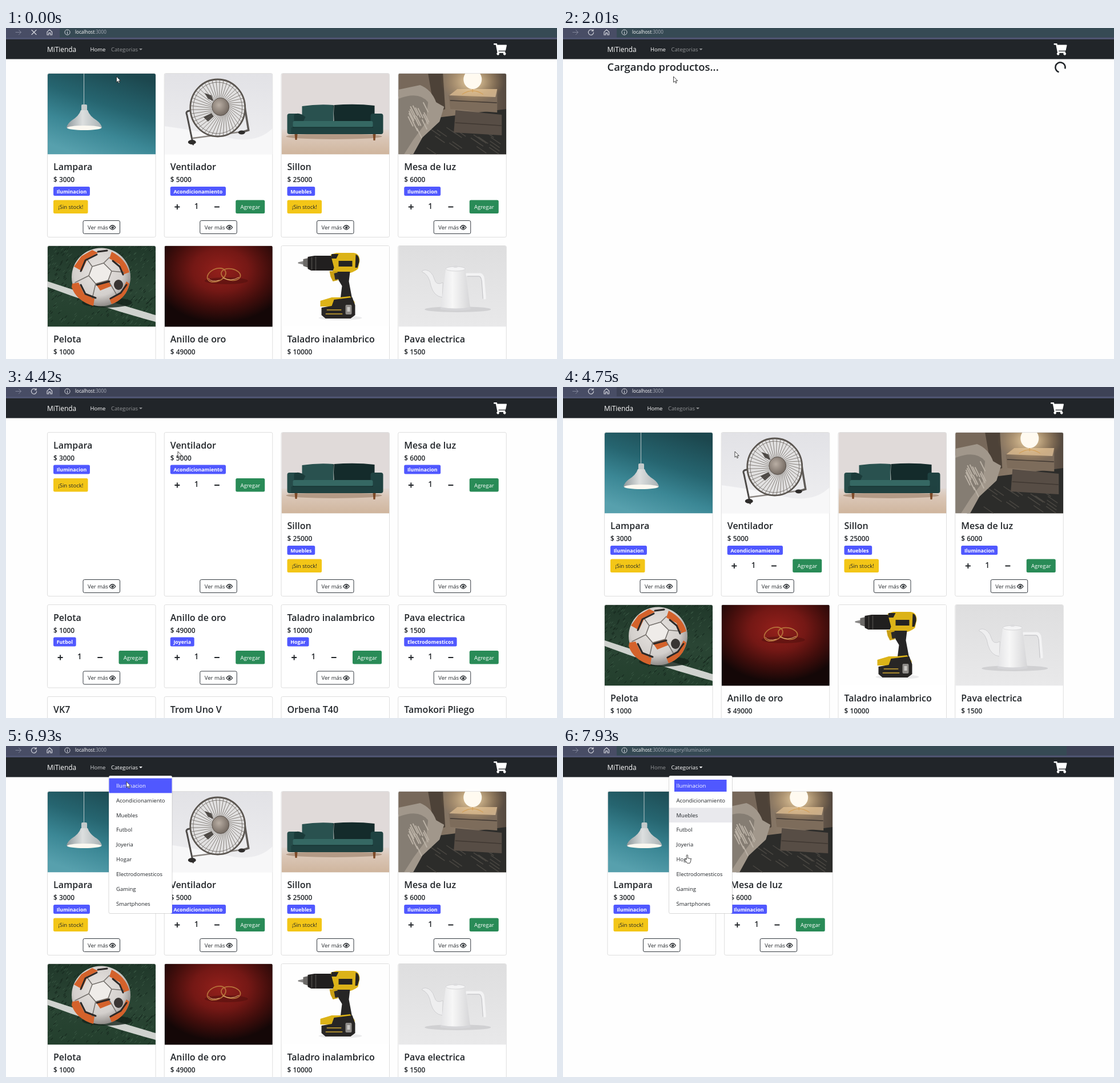
These frames come from a looping animation (965x580 px, 8000 ms). An HTML page:

```html
<!DOCTYPE html>
<html lang="es">
<head>
<meta charset="utf-8">
<title>MiTienda</title>
<style>
html, body { margin: 0; width: 100%; height: 100%; overflow: hidden; background: #fefefe; }
svg { display: block; width: 100vw; height: 100vh; }
text { font-family: "Open Sans", "Noto Sans", sans-serif; font-size: 9.5px; fill: #212529; white-space: pre; }
.title { font-size: 16px; font-weight: 600; }
.price { font-size: 11.9px; font-weight: 600; }
.badge text { font-size: 8.85px; font-weight: 700; fill: #fff; }
.qty { font-size: 13.5px; font-weight: 600; }
.mid { text-anchor: middle; }
.brand { font-size: 11.9px; fill: #fff; }
.loading { font-size: 18.4px; font-weight: 600; }
.url, .url tspan { font-size: 8.15px; }
.line { fill: none; stroke-linecap: round; }
</style>
</head>
<body>
<svg id="stage" viewBox="0 0 965 580" preserveAspectRatio="none"></svg>
<script>
const LOOP = 8000, SHIFT = 5.5, IMG_H = 141.5, CARD_W = 189.5;
const stage = document.getElementById('stage');
const BLUE = '#5058ff';

const rect = (x, y, w, h, fill, extra = '') =>
  `<rect x="${x}" y="${y}" width="${w}" height="${h}" fill="${fill}" ${extra}/>`;
const path = (d, fill, extra = '') => `<path d="${d}" fill="${fill}" ${extra}/>`;
const line = (d, stroke, w = 1) => `<path class="line" d="${d}" stroke="${stroke}" stroke-width="${w}"/>`;
const oval = (x, y, rx, ry, fill, extra = '') =>
  `<ellipse cx="${x}" cy="${y}" rx="${rx}" ry="${ry}" fill="${fill}" ${extra}/>`;
const text = (x, y, s, cls = '', extra = '') => `<text x="${x}" y="${y}" class="${cls}" ${extra}>${s}</text>`;
const stops = list => list.map(([o, c, a = 1]) => `<stop offset="${o}" stop-color="${c}" stop-opacity="${a}"/>`).join('');
const linear = (id, [x1, y1, x2, y2], ...list) =>
  `<linearGradient id="${id}" x1="${x1}" y1="${y1}" x2="${x2}" y2="${y2}">${stops(list)}</linearGradient>`;
const radial = (id, cx, cy, r, ...list) =>
  `<radialGradient id="${id}" cx="${cx}" cy="${cy}" r="${r}">${stops(list)}</radialGradient>`;
const backdrop = fill => rect(0, 0, 189, IMG_H, fill);
const DOWN = [0, 0, 0, 1], ACROSS = [0, 0, 1, 0];

let seed = 7;
const random = () => (seed = seed * 16807 % 2147483647) / 2147483647;

// Short random strokes for grass, wood grain and carpet.
function strokes(n, [x, y, w, h], dx, dy) {
  let d = '';
  for (let i = 0; i < n; i++) d += `M${(x + w * random()).toFixed(1)} ${(y + h * random()).toFixed(1)}l${dx} ${dy}`;
  return d;
}

function fan() {
  let wires = '';
  for (let i = 0; i < 44; i++) {
    const a = i * Math.PI / 22, b = a + 0.22;
    wires += `M${98 + 16 * Math.cos(a)} ${58 + 16 * Math.sin(a)}L${93 + 47 * Math.cos(b)} ${60 + 49 * Math.sin(b)}`;
  }
  return backdrop('url(#fanBg)') + path('M0 92Q60 100 110 112T189 96V141.5H0z', '#f7f7f8') +
    line('M55 62L40 66Q37 68 39 72L50 124', '#4e4b49', 3) +
    line('M134 46Q138 45 139 50L147 99L134 103', '#5f5b58', 3.5) +
    line('M50 113L96 107L134 102', '#8b8682', 2.5) +
    oval(48, 120, 7, 4, '#2e2c2b') + oval(135, 103, 6, 3.5, '#2e2c2b') +
    oval(93, 60, 48, 50, '#e2e1e1', 'stroke="#5a5550" stroke-width="2.8"') +
    path('M70 34L82 38L86 48L76 44zM68 76L82 69L86 75L76 84z', '#4a4643') +
    line(wires, '#6b655f', 0.8) + oval(93, 60, 43, 45, 'none', 'stroke="#6a6561" stroke-width=".8"') +
    oval(98, 58, 15, 15.5, 'url(#hub)', 'stroke="#57504a"');
}

const photos = {
  lamp: backdrop('url(#lampBg)') + line('M63.5 0V55', '#b9c6c7') +
    rect(59, 54, 10, 12, '#c4cacb', 'rx="2"') +
    path('M58 64Q55 74 42 82Q34 88 33 95Q64 102 95 95Q94 88 86 82Q73 74 70 64z', 'url(#lampShade)') +
    oval(64, 95, 30, 4, '#fbf8f0'),
  fan: fan(),
  sofa: backdrop('#e0dad9') + path('M0 98H189V141.5H0z', 'url(#floor)') +
    oval(92, 110, 84, 5, '#b39a86') +
    path('M23 106H28L27 116H24zM160 106H165L164 117H161z', '#7d4a28') +
    path('M36 57Q64 53 91 55V88H36z', '#29514f') + path('M92 55Q130 52 163 56V88H92z', '#142b2b') +
    rect(10, 70, 22, 36, '#264c4a', 'rx="4"') + rect(156, 70, 22, 36, '#1f4241', 'rx="4"') +
    path('M22 72Q30 66 42 76L38 84H22z', '#1b3b3a') +
    rect(20, 83, 140, 11, '#356863', 'rx="3"') + rect(17, 94, 155, 12, '#1f4140') +
    line('M20 94H160M91 56L93 83', '#102827'),
  table: backdrop('url(#bedWall)') + path('M0 0H52L66 40L64 70L0 40z', '#77685a') + path('M52 0H78L82 62L64 70z', '#4d4238') +
    path('M60 78L189 62V141.5H20z', '#2c2c2a') +
    line(strokes(22, [50, 84, 120, 50], 16, 11), '#494641', 1.5) +
    path('M0 28L38 20Q58 28 66 50L80 58L72 84L42 112L26 141H0z', '#a1978b') +
    path('M0 44Q36 30 52 50L48 86L26 116L10 141H0z', '#857d73') +
    line(strokes(16, [2, 48, 46, 52], 8, 16), '#bab1a5', 2) +
    path('M88 38L103 27H173V68L91 62z', '#7d6c5b') + path('M89 38L103 27H173L170 41z', '#c9ae8c') +
    path('M100 64L181 72V108L97 103z', '#574d45') + line('M91 47L172 51M100 86L180 91', '#3f3731', 1.5) +
    oval(130, 14, 56, 38, 'url(#glow)') + line('M112 36Q130 24 148 36M130 26V32', '#d3a25e', 1.5) +
    oval(130, 10, 16, 17, '#fffaf0'),
  ball: backdrop('url(#grass)') + line(strokes(220, [0, 0, 189, 141], 3, -3), '#3b5a45', 1) +
    line(strokes(200, [0, 0, 189, 141], 3, -3), '#182b20', 1.2) +
    path('M0 62Q90 92 189 121V133Q90 106 0 72z', '#cfd2ce') + oval(104, 99, 44, 9, '#15241b', 'opacity=".8"') +
    oval(93.5, 54.5, 51.5, 51, 'url(#ballTone)') +
    path('M46 36L59 18L78 7L88 12L70 22L60 44zM112 10Q136 22 143 46L132 50L126 32L108 22zM43 66L54 64L64 84L82 92L80 105Q50 96 42 72zM138 62L143 66Q138 92 112 102L108 92L128 82zM84 66L106 60L112 70L92 78z', '#d4622b') +
    path('M78 36L98 30L112 44L106 60L84 66L72 52z', '#efece9') +
    line('M78 36L68 22M98 30L108 20M112 44L134 46M106 60L120 84M84 66L78 92M72 52L48 64M78 36L98 30L112 44L106 60L84 66L72 52z', '#77736f', 1.6) +
    line('M58 44L66 25L86 15M114 26L126 36L132 50M58 68L66 84L84 91M110 92L128 82L138 68M88 10L104 8M86 68L108 62', '#2c2928', 3) +
    oval(124, 68, 8, 9, '#393533'),
  rings: backdrop('#140707') + backdrop('url(#velvet)') + oval(108, 61, 38, 6, '#4c0f0d', 'opacity=".5"') +
    `<g fill="none" stroke="#b5713a" stroke-width="1.8">${oval(91, 51, 17, 11, 'none', 'transform="rotate(-24 91 51)"')}${oval(116, 50, 17, 10, 'none', 'transform="rotate(10 116 50)"')}</g>` +
    line('M77 57Q82 64 96 60M102 56Q116 63 130 55', '#e8b87c', 1),
  drill: backdrop('#fefefe') + oval(103, 126, 38, 4, '#ebebec') +
    path('M29 28.5L40 26V33L29 30.5z', '#8a8988') + path('M38 23L47 21V38L38 35z', '#6b6967') +
    path('M46 19L58 17H94V43H52L46 40z', '#211f1f') + line('M53 20V41M60 19V42', '#4b4947', 1.5) +
    path('M86 15L96 12H126Q137 13 137 26L134 40Q126 47 114 48H88L92 38z', '#dcb318') +
    path('M100 26H124V36H100zM88 14H100L96 22H86zM130 15Q137 17 136 28L133 38H129z', '#252423') +
    path('M96 45H120L118 62L124 94H103L106 70L100 60z', '#262525') +
    path('M84 44H98L99 60L90 62L86 54z', '#c99f14') + path('M92 48L100 46V58L94 59z', '#2b2929') +
    path('M68 96L88 90H102L120 88L128 98V106H68z', '#dcb318') + path('M92 94L124 90L129 104V121L121 127H77L70 121V108L88 105z', '#282625') +
    rect(112, 103, 11, 17, '#8e8b88', 'rx="2"') + rect(115, 107, 5, 8, '#c9c7c4') + line('M80 112H104M78 119H106', '#a8892e', 2),
  kettle: backdrop('url(#kettleBg)') + oval(104, 111, 58, 5, '#d0d0d2') +
    path('M78 64L77 90Q62 88 57 70Q54 50 41 45Q42 42 48 42Q59 44 63 58Q66 70 78 64z', '#eeeeef', 'stroke="#c8c8cb" stroke-width=".8"') +
    line('M120 50H142Q147 50 148 57L151 91', '#f3f3f4', 5) + line('M121 53H141Q145 54 146 62L148 92', '#bfbfc3', 1) +
    path('M83 40Q100 36 117 40L126 110Q100 115 74 110z', 'url(#kettleBody)') +
    oval(100, 40, 17, 4, '#f4f4f5', 'stroke="#cfcfd1" stroke-width=".8"') + oval(100, 36, 4, 2, '#dcdcde') +
    path('M74 107Q100 112 126 107V111Q100 116 74 111z', '#d5d5d8')
};

const defs = `<defs>
<clipPath id="frame"><path d="M0 ${IMG_H}V2.5Q0 0 2.5 0H186.5Q189 0 189 2.5V${IMG_H}z"/></clipPath>` +
  linear('lampBg', [0.75, 0, 0.3, 1], [0, '#1c474e'], [0.4, '#266570'], [0.7, '#3b8795'], [1, '#57a0ad']) +
  linear('lampShade', ACROSS, [0, '#8f999c'], [0.45, '#dcdfdf'], [1, '#aab2b4']) +
  linear('fanBg', DOWN, [0, '#e2e2e6'], [1, '#efeff1']) +
  radial('hub', 0.4, 0.4, 0.6, [0, '#b9aea4'], [1, '#766c64']) +
  linear('floor', DOWN, [0, '#e0d6d0'], [0.35, '#dac6b6'], [1, '#cfb59d']) +
  linear('bedWall', ACROSS, [0, '#6f6255'], [0.6, '#8c7b69'], [1, '#55493f']) +
  radial('glow', 0.5, 0.5, 0.5, [0, '#ffe7b8', 0.9], [1, '#c99a5c', 0]) +
  linear('grass', DOWN, [0, '#20382a'], [0.5, '#2a4534'], [1, '#233f2d']) +
  radial('ballTone', 0.45, 0.4, 0.6, [0, '#e9e5e2'], [0.7, '#d3cfcc'], [1, '#918d8a']) +
  radial('velvet', 0.52, 0.3, 0.65, [0, '#94201b'], [0.4, '#741815'], [0.7, '#430e0c'], [1, '#140707']) +
  linear('kettleBg', DOWN, [0, '#dededf'], [1, '#e9e9ea']) +
  linear('kettleBody', ACROSS, [0, '#e4e4e6'], [0.4, '#f7f7f7'], [1, '#d6d6d8']) +
  Object.entries(photos).map(([id, s]) => `<g id="${id}" clip-path="url(#frame)">${s}</g>`).join('') + '</defs>';

// name, price, category, photo, out of stock
const products = [
  ['Lampara', 3000, 'Iluminacion', 'lamp', true],
  ['Ventilador', 5000, 'Acondicionamiento', 'fan'],
  ['Sillon', 25000, 'Muebles', 'sofa', true],
  ['Mesa de luz', 6000, 'Iluminacion', 'table'],
  ['Pelota', 1000, 'Futbol', 'ball'],
  ['Anillo de oro', 49000, 'Joyeria', 'rings'],
  ['Taladro inalambrico', 10000, 'Hogar', 'drill'],
  ['Pava electrica', 1500, 'Electrodomesticos', 'kettle'],
  ['VK7', 90000, 'Gaming', ''],
  ['Trom Uno V', 80000, 'Gaming', ''],
  ['Orbena T40', 70000, 'Smartphones', ''],
  ['Tamokori Pliego', 60000, 'Gaming', '']
];
const categories = [...new Set(products.map(p => p[2]))];

function card([name, price, category, photo, soldOut], col, y, h, loaded) {
  const x = 72.5 + 204.75 * col, top = loaded ? y + IMG_H : y, tx = x + 10.5;
  const by = y + h - 29, bx = x + 62.5;
  const buy = soldOut
    ? rect(tx, top + 80.5, 60.5, 23.5, '#f3c617', 'rx="2.5"') + text(tx + 30.2, top + 96, '¡Sin stock!', 'mid')
    : line(`M${x + 18.8} ${top + 92.5}h7.6m-3.8-3.8v7.6M${x + 88.5} ${top + 92.5}h7.4`, '#212529', 1.9) +
      text(x + 56.3, top + 95.5, '1', 'qty mid') +
      rect(x + 125, top + 80.5, 51, 23.5, '#298b57', 'rx="2.5"') +
      text(x + 150.5, top + 96, 'Agregar', 'mid', 'style="fill:#fff"');
  return rect(x, y, CARD_W, h, '#fff', 'rx="2.5" stroke="#dedede"') +
    (loaded ? `<use href="#${photo}" x="${x + 0.5}" y="${y + 0.5}"/>` : '') +
    text(tx, top + 28, name, 'title') + text(tx, top + 49, '$ ' + price, 'price') +
    `<g class="badge">${rect(tx, top + 57, 60, 16, BLUE, 'rx="2.5"')}${text(tx + 5.7, top + 68.5, category)}</g>` + buy +
    rect(bx, by, 64.5, 23, '#fff', 'rx="2.5" stroke="#343a40"') + text(bx + 8, by + 15.3, 'Ver más') +
    `<g transform="translate(${x + 114} ${by + 12})">${path('M-5.3 0Q0-7.6 5.3 0Q0 7.6-5.3 0z', 'none', 'stroke="#212529" stroke-width="1.2"')}${oval(0, 0, 2.3, 2.3, '#212529')}${oval(-0.7, -0.7, 0.8, 0.8, '#fff')}</g>`;
}

const home = products.slice(0, 8).map((p, i) => card(p, i % 4, i < 4 ? 79.5 : 381.5, 287, true)).join('');
const rowY = [79.5, 381.5, 542.5], rowH = [287, 145.5, 145.5];
const partial = products.map((p, i) => card(p, i % 4, rowY[i >> 2], rowH[i >> 2], p[3] === 'sofa')).join('');
const filtered = card(products[0], 0, 79.5, 287, true) + card(products[3], 1, 79.5, 287, true);

const ICON = '#d9dbe2';
const toolbar = rect(0, 0, 965, 20, '#484d65') + rect(94, 0, 871, 16.5, '#3d4256') +
  rect(94, 0, 871, 16.5, '#364a54', 'id="tint"') + rect(0, 17, 965, 2, '#505673') +
  line('M17 7.5H26.5M22.5 3.5L26.5 7.5L22.5 11.5', '#81859a') +
  `<g id="stop">${line('M45 3.5L53 11.5M53 3.5L45 11.5', ICON, 1.1)}</g>` +
  `<g id="reload">${line('M52.8 5A4.6 4.6 0 1 0 53.6 7.8M53 2.5V5.3H50.2', ICON, 1.1)}</g>` +
  line('M72 6.8L76.3 3L80.6 6.8V12H77.8V8.6H74.8V12H72z', ICON, 1.1) +
  oval(107.5, 7.5, 4.6, 4.6, 'none', `stroke="${ICON}"`) + line('M107.5 7.2V10M107.5 5V5.1', ICON, 1.1) +
  `<text x="121" y="10.3" class="url" style="fill:#fff">localhost<tspan id="route" style="fill:#a9adb8"></tspan></text>`;

const cart = path('M24 0h104q20 0 24 20l8 44h392q26 0 22 30l-46 207q-5 19-24 19H212l7 32h268q28 0 23 30l-6 24a56 56 0 1 1-63 10H231a56 56 0 1 1-67-9L94 64H24Q0 64 0 40V24Q0 0 24 0z',
  '#fff', 'id="cart" transform="translate(854 27) scale(.04)"');

const menu = `<g id="menu">` + rect(180, 52, 111, 241.5, '#fff', 'rx="2.5" stroke="#000" stroke-opacity=".15"') +
  rect(180.5, 0, 110, 25.8, '#e9e9ed', 'id="hover"') + rect(189.5, 59, 91.5, 21, BLUE, 'id="current"') +
  categories.map((c, i) => text(193, 73 + 25.83 * i, c, '', i ? '' : 'id="first"')).join('') + '</g>';

stage.innerHTML = defs + rect(0, 0, 965, 580, '#fefefe') + toolbar + rect(0, 20, 965, 34.5, '#212529') +
  `<g id="home">${home}</g><g id="partial">${partial}</g><g id="filtered" transform="translate(${SHIFT})">${filtered}</g>` +
  `<g id="loading">${text(77.5, 74.5, 'Cargando productos...', 'loading')}<path id="spinner" class="line" style="stroke-linecap:butt" d="M6.1 6.1A8.65 8.65 0 1 1 6.1-6.1" stroke="#212529" stroke-width="2.6"/></g>` +
  `<g id="nav">${text(72, 42, 'MiTienda', 'brand')}${text(147.5, 41, 'Home', '', 'id="homeLink"')}` +
  `<g id="catLink">${text(184, 41, 'Categorias', '', 'style="fill:inherit"')}<path d="M233 36H239L236 39z"/></g>${cart}${menu}</g>` +
  `<g id="cursor" stroke="#1c1c1c" stroke-width=".8" stroke-linejoin="round">` +
  path('M0 0V10.2L2.4 8L4 11.7L5.6 11L4.1 7.4H7.2z', '#fff', 'id="arrow"') +
  path('M3.2 8.5V1.5a1.2 1.2 0 0 1 2.4 0V6l4 .8q1.6.4 1.5 2L10.4 12.5L9.2 14.8H4.5L.6 9.6Q-.2 8.4 1 7.8T3.2 8.5z', '#fff', 'id="hand"') + '</g>';

const $ = Object.fromEntries([...stage.querySelectorAll('[id]')].map(e => [e.id, e]));
for (const b of stage.querySelectorAll('.badge'))
  b.firstChild.setAttribute('width', b.lastChild.getComputedTextLength() + 11.4);

const show = (el, on) => { el.style.display = on ? '' : 'none'; };
const move = (el, x, y, turn = 0) => el.setAttribute('transform', `translate(${x} ${y}) rotate(${turn})`);

// time, x, y, hand pointer
const pointer = [
  [0, 193.5, 85], [2990, 230, 62], [3110, 275, 42], [3230, 320, 30], [3350, 340, 27.5], [3470, 331, 42],
  [3590, 312, 71], [3840, 301, 113], [5030, 262, 142], [5160, 221, 164], [5430, 217, 132], [5550, 211, 86],
  [5670, 208, 55], [5790, 206, 36, 1], [6430, 207, 44, 1], [6570, 208, 52], [6690, 210, 59], [6810, 211, 62.5],
  [7170, 213, 56], [7410, 209, 48], [7690, 210, 36, 1], [7810, 212, 104, 1], [7930, 213, 190.5, 1]
];

// The spinner only repaints on these ticks.
function spinTime(t) {
  if (t < 870) return 500;
  if (t < 1170) return 870;
  if (t < 2990) return 1170 + 120 * Math.min(14, Math.floor((t - 1170) / 120));
  return 2990 + 120 * Math.min(5, Math.floor((t - 2990) / 120));
}

function draw(t) {
  const page = t < 500 ? 'home' : t < 4420 ? 'loading' : t < 4750 ? 'partial' : t < 7050 ? 'home' : 'filtered';
  for (const p of ['home', 'loading', 'partial', 'filtered']) show($[p], p === page);
  const byCategory = page === 'filtered';
  move($.nav, page === 'loading' || byCategory ? SHIFT : 0, 0);

  show($.stop, t < 870);
  show($.reload, t >= 870);
  show($.cart, t < 500 || t >= 870);
  show($.tint, t < 2990 || byCategory);
  $.tint.setAttribute('width', byCategory ? 788 : 871);
  $.route.textContent = ':3000' + (byCategory ? '/category/iluminacion' : '');
  if (page === 'loading') move($.spinner, 871, 69, 40 + (spinTime(t) - 500) * 1400 / 2850);

  const open = t >= 6310 && t < 7050 || t >= 7810;
  const pressed = t >= 6930 && !byCategory;
  const row = t >= 7930 ? 2 : t >= 7810 ? 1 : 0;
  show($.menu, open);
  show($.hover, t >= 6690);
  $.hover.setAttribute('y', 56.6 + 25.83 * row);
  $.hover.setAttribute('fill', pressed ? BLUE : '#e9e9ed');
  show($.current, byCategory);
  $.first.style.fill = pressed || byCategory ? '#fff' : '';
  $.homeLink.style.fill = byCategory ? '#929496' : pressed ? '#d2d4d6' : '#fff';
  $.catLink.style.fill = open || t >= 7690 ? '#fff' : t >= 5790 && t < 6310 ? '#c8c9ca' : '#929496';

  const [, x, y, hand] = pointer.findLast(p => p[0] <= t);
  move($.cursor, x, y);
  show($.arrow, !hand);
  show($.hand, hand);
}

const start = performance.now();
function tick() {
  draw((performance.now() - start) % LOOP);
  requestAnimationFrame(tick);
}
tick();
</script>
</body>
</html>
```
